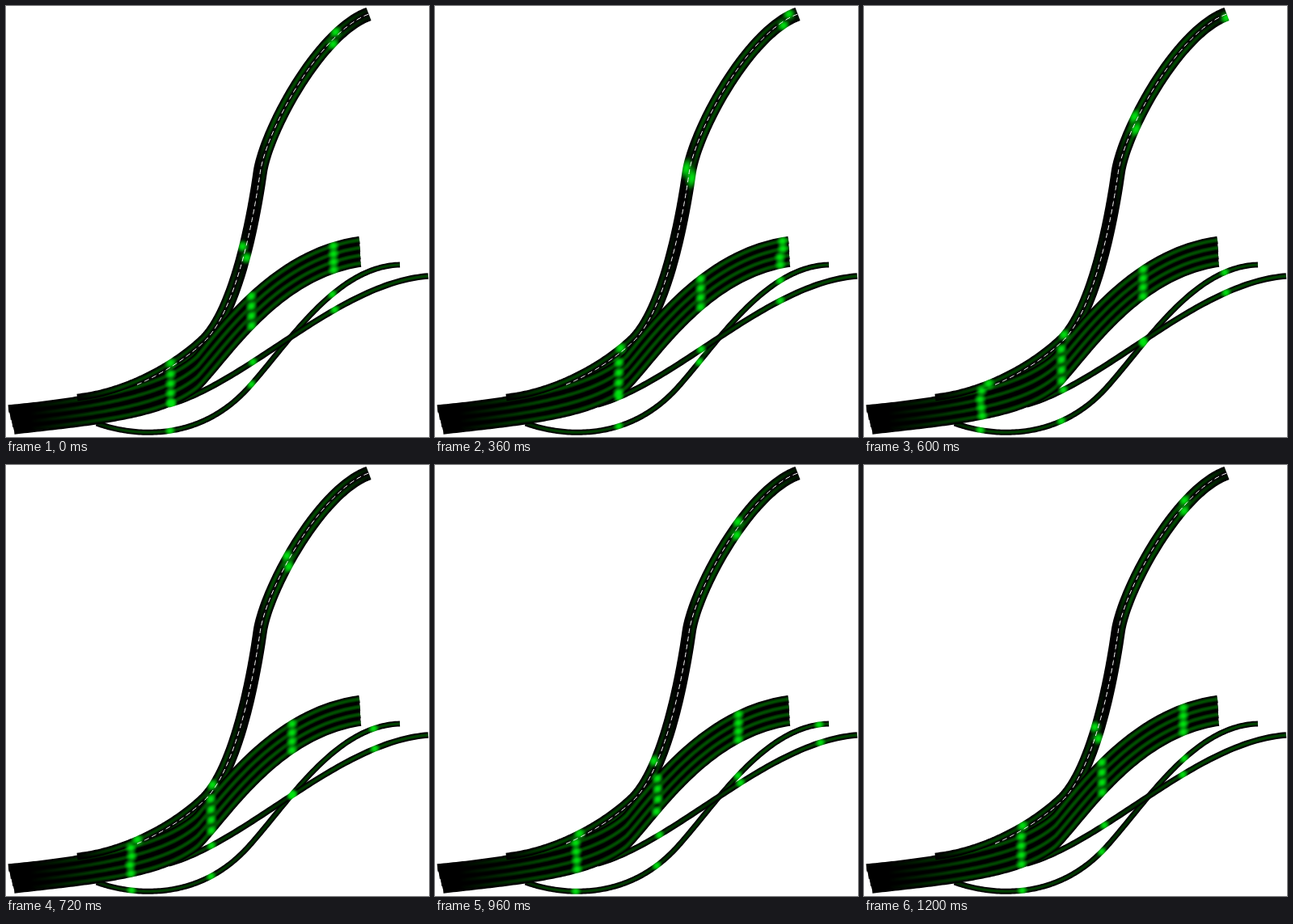
Write an HTML page with a canvas that moves like this. It is 523x533 px and loops after 1320 ms.

```html
<!DOCTYPE html>
<html lang="en">
<head>
<meta charset="utf-8">
<title>Pulses along lanes</title>
<style>
  html, body { margin: 0; width: 100%; height: 100%; overflow: hidden; background: #fff; }
  canvas { display: block; }
</style>
</head>
<body>
<canvas id="stage" width="523" height="533"></canvas>
<script>
const W = 523, H = 533, STEP = 120, STEPS = 11, LAST_AGE = 37;
const ctx = document.getElementById('stage').getContext('2d');
const mix = (a, b, t) => a + (b - a) * t;

// Samples a chain of cubic Beziers given as flat coordinates
function curve(...c) {
  const out = [];
  for (let i = 0; i + 7 < c.length; i += 6) {
    for (let j = i ? 1 : 0; j <= 80; j++) {
      const t = j / 80, u = 1 - t;
      out.push([i, i + 1].map(k =>
        u * u * u * c[k] + 3 * u * u * t * c[k + 2] + 3 * u * t * t * c[k + 4] + t * t * t * c[k + 6]));
    }
  }
  return out;
}

function angleAt(path, i) {
  const a = path[Math.max(0, i - 1)], b = path[Math.min(path.length - 1, i + 1)];
  return Math.atan2(b[1] - a[1], b[0] - a[0]);
}

const offset = (path, d) => path.map(([x, y], i) => {
  const r = angleAt(path, i);
  return [x - Math.sin(r) * d, y + Math.cos(r) * d];
});

const between = (a, b, t) => a.map(([x, y], i) => [mix(x, b[i][0], t), mix(y, b[i][1], t)]);

// Geometry
const bandTop = curve(3, 498, 110, 488, 198, 470, 237, 433, 272, 390, 338, 303, 437, 289.5);
const bandBottom = curve(10, 525, 120, 513, 195, 505, 237, 471, 275, 432, 335, 334, 438.5, 318);
const band = [0, 1, 2, 3].map(n => between(bandTop, bandBottom, n / 3));

const roadLeft = curve(88, 484, 145, 478, 205, 447, 243, 411, 281, 373, 302, 262, 310, 205,
  318, 152, 385, 28, 447, 6);
const roadRight = offset(roadLeft, 8.5);
const roadCentre = offset(roadLeft, 4.3).filter(p => p[0] > 161);

const upperBranch = curve(112, 516, 165, 535, 240, 535, 296, 476, 345, 424, 405, 322, 487, 320);
const lowerBranch = curve(201, 493, 300, 465, 412, 342, 522, 334);

// Distance along the road, zero where x passes 201
const arc = [0];
roadLeft.forEach(([x, y], i) => {
  if (i) arc.push(arc[i - 1] + Math.hypot(x - roadLeft[i - 1][0], y - roadLeft[i - 1][1]));
});
const arcZero = arc[roadLeft.findIndex(p => p[0] >= 201)];
const roadIndex = s => arc.findIndex(a => a >= s + arcZero);

// Nearly even speed in x, with a slight sway once per loop
const pulseX = age => 200.3 + 9.1 * (age - 6) - 2.2 * Math.cos(2 * Math.PI * (age + 0.2) / STEPS);
// Along the road the pulse rushes through the steep middle
const pulseArc = age => 9.1 * (age - 6) + 285 / (1 + Math.exp((19.8 - age) / 2.8));

function glow(...levels) {
  const g = ctx.createLinearGradient(0, 0, W, 0);
  for (const [x, a] of levels) g.addColorStop(x / W, `rgba(0,125,0,${a})`);
  return g;
}
const bandGlow = glow([30, 0], [130, 0.24], [230, 0.3]);
const roadGlow = glow([88, 0], [140, 0.24], [270, 0.2], [299, 0], [311, 0], [328, 0.28],
  [400, 0.26], [447, 0.06]);
const thinGlow = glow([110, 0.1], [150, 0.25], [340, 0.16], [400, 0.25]);

function trace(path) {
  ctx.beginPath();
  for (const [x, y] of path) ctx.lineTo(x, y);
}

function stroke(path, style, width) {
  trace(path);
  ctx.strokeStyle = style;
  ctx.lineWidth = width;
  ctx.stroke();
}

function lane(path, width, shine) {
  stroke(path, '#000', width);
  for (const k of [0.6, 0.38, 0.17]) stroke(path, shine, width * k);
}

function blob(path, i, size, stretch = 1) {
  if (i < 0) return;
  ctx.save();
  ctx.translate(...path[i]);
  ctx.rotate(angleAt(path, i));
  ctx.scale(stretch, 1);
  const g = ctx.createRadialGradient(0, 0, 0, 0, 0, size);
  for (let r = 0; r <= 1; r += 0.125) {
    g.addColorStop(r, `rgba(0,232,16,${0.95 * (1 - r * r) ** 2})`);
  }
  ctx.fillStyle = g;
  ctx.fillRect(-size, -size, 2 * size, 2 * size);
  ctx.restore();
}

function blobAtX(path, x, size) {
  if (x >= path[0][0]) blob(path, path.findIndex(p => p[0] >= x), size);
}

function pulse(age) {
  const x = pulseX(age), s = pulseArc(age);
  const stretch = 1 + 0.8 * Math.exp(-((age - 20.5) ** 2) / 2);
  for (const path of band) blobAtX(path, x, 9);
  blob(roadLeft, roadIndex(s), 10, stretch);
  if (age >= 15) blob(roadRight, roadIndex(s - 12), 10, stretch);
  blobAtX(upperBranch, x, 8.5);
  blobAtX(lowerBranch, x, 8.5);
}

function draw(step) {
  ctx.clearRect(0, 0, W, H);
  lane(upperBranch, 7, thinGlow);
  lane(lowerBranch, 7.5, thinGlow);
  lane(roadRight, 8.8, roadGlow);
  trace([...bandTop, ...bandBottom.slice().reverse()]);
  ctx.fillStyle = '#000';
  ctx.fill();
  for (const path of band) lane(path, 9.4, bandGlow);
  lane(roadLeft, 8.8, roadGlow);

  // Pulses light up only what is already painted
  ctx.globalCompositeOperation = 'source-atop';
  for (let age = (step + 6) % STEPS; age <= LAST_AGE; age += STEPS) pulse(age);
  ctx.globalCompositeOperation = 'source-over';

  ctx.setLineDash([6, 4]);
  stroke(roadCentre, '#fff', 1);
  ctx.setLineDash([]);
}

const start = performance.now();
let shown = -1;
function tick() {
  const step = Math.floor((performance.now() - start) / STEP) % STEPS;
  if (step !== shown) draw(shown = step);
  requestAnimationFrame(tick);
}
tick();
</script>
</body>
</html>
```
